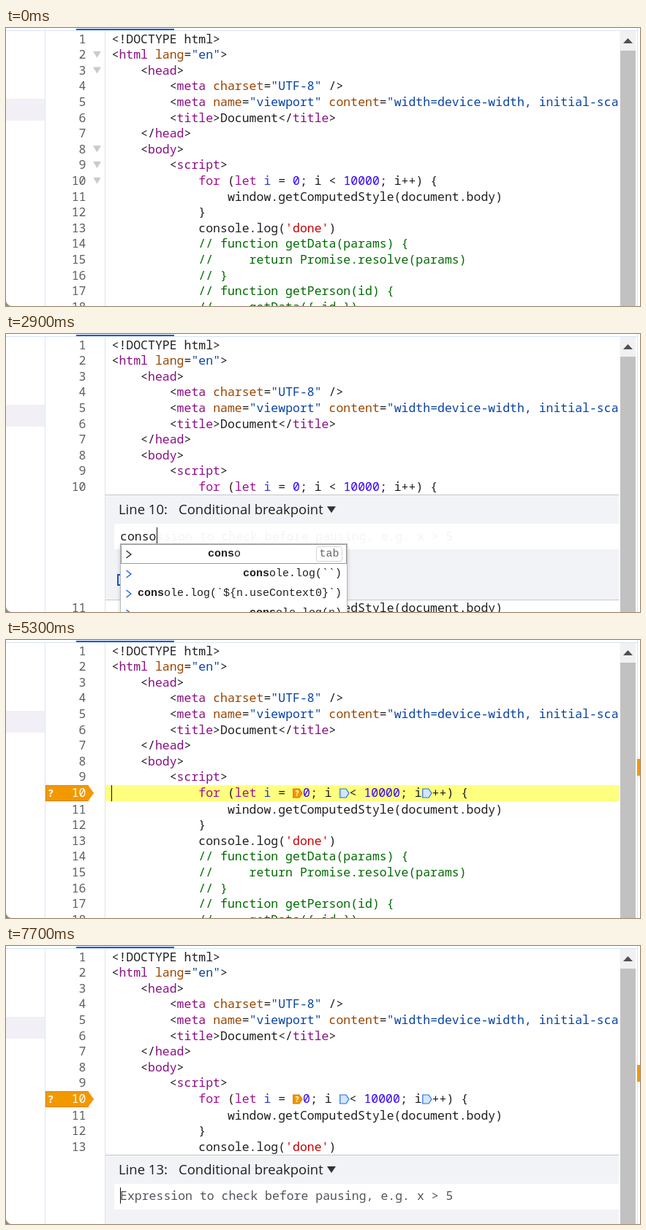
Write an HTML page that moves like this. It is 867 by 381 pixels and loops after 8 s.

```html
<!DOCTYPE html>
<html lang="en">
<head>
<meta charset="UTF-8">
<title>Conditional breakpoint</title>
<style>
  html, body { margin: 0; width: 100%; height: 100%; overflow: hidden; background: #fff; }
  #stage { position: relative; width: 867px; height: 381px; overflow: hidden; background: #fff; color: #1f1f1f; }
  #stage div { position: absolute; box-sizing: border-box; }
  [hidden] { display: none !important; }
  .mono, #code { font: 16.5px/21.6px "Noto Sans Mono", monospace; white-space: pre; }
  .ui { font: 18.5px/24px "Open Sans", sans-serif; white-space: pre; }

  #code { left: 54px; top: 4.2px; width: 784px; height: 377px; overflow: hidden; }
  #stage .row { position: relative; height: 21.6px; padding-left: 90.5px; }
  #stage .row.marked { height: 22.6px; line-height: 22.6px; }
  .num { left: 0; top: -.6px; width: 55.5px; text-align: right; color: #5c5f62; }
  .marked .num { color: #fff; }
  .fold { left: 65px; top: 6px; width: 11px; height: 9px; background: #606060; clip-path: polygon(0 0, 100% 0, 50% 100%); }
  .flag { left: 0; top: 0; width: 66px; height: 100%; clip-path: polygon(0 0, 58px 0, 66px 50%, 58px 100%, 0 100%); }
  .hover { background: #c3d7f8; }
  .bp { background: #f29900; box-shadow: inset 0 0 0 1px #e37e00; color: #fff; font-weight: bold; font-size: 14px; padding-left: 3px; }
  .glow { left: 82px; right: 0; top: 0; height: 100%; }
  .text { position: relative; top: -.6px; }
  .mark { display: none; width: 14px; height: 14px; vertical-align: -2px; }
  .marked .mark { display: inline-block; }
  .caret { width: 1px; height: 22px; background: #111; }
  .t { color: #8a0e85; } .k { color: #a0108f; } .a { color: #994500; } .v { color: #0842a0; }
  .d { color: #2a3fd0; } .n { color: #3200ff; } .s { color: #c80000; } .c { color: #006a00; }

  #stage #panel { position: relative; z-index: 1; margin-left: 82px; background: #f1f3f6; box-shadow: inset 0 1px #c6c8cb, inset 0 -1px #c6c8cb; }
  #title { left: 18px; top: 8px; }
  #kind { left: 100px; top: 8px; }
  #drop { left: 303px; top: 16px; width: 12px; height: 9px; background: #333; clip-path: polygon(0 0, 100% 0, 50% 100%); }
  #input { left: 12px; right: 0; top: 40px; height: 35px; padding: 5.5px 0 0 8px; background: #fff; overflow: hidden; }
  .hint { color: #50555a; }
  .ghost { color: #f4f4f4; }
  #link { left: 41px; top: 105px; color: #0b4fd8; font-size: 18.2px; text-decoration: underline; text-underline-offset: 2px; }
  #icon { position: absolute; left: 15px; top: 108px; }

  #list { left: 21px; top: 68px; background: #fff; box-shadow: 0 0 0 1px #b5b8bc, 0 2px 6px #0004; font: 15px/27px "Liberation Mono", monospace; }
  #stage .item { position: relative; display: flex; justify-content: space-between; align-items: center; height: 27px; padding: 0 7px 0 6px; gap: 7px; }
  #stage .item:first-child { border: 1px dotted #333; padding: 0 5px; }
  .item:first-child .word { margin: 0 9px; }
  .tab { width: 36px; line-height: 19px; box-sizing: border-box; border: 1px solid #d5d5d5; border-radius: 3px; text-align: center; color: #666; }

  #menu { width: 314px; height: 192px; background: #fff; border-radius: 6px; box-shadow: 0 0 0 1px #d0d0d0, 3px 4px 10px #0003; overflow: hidden; }
  .choice { left: 1px; width: 312px; height: 34.5px; padding-left: 24px; font: 14.5px/34px "Open Sans", sans-serif; }
</style>
</head>
<body>
<div id="stage">
  <div style="left:0;top:97px;width:53px;height:30px;background:#f2f0f6"></div>
  <div style="left:53px;top:3px;width:1px;height:378px;background:#d9e4fa"></div>
  <div style="left:135px;top:4px;width:1px;height:377px;background:#dfe3ea"></div>
  <div id="code"></div>
  <div style="left:0;top:3px;width:863px;height:1px;background:#d9e4fa"></div>
  <div style="left:96px;top:1px;width:134px;height:2px;background:#1a57d6"></div>
  <div style="left:838px;top:4px;width:24px;height:377px;background:#fbfbfb"></div>
  <div style="left:840px;top:4px;width:21px;height:27px;background:#f1f1f1"></div>
  <div style="left:844px;top:14px;width:13px;height:7px;background:#505050;clip-path:polygon(50% 0,100% 100%,0 100%)"></div>
  <div style="left:840px;top:31px;width:21px;height:350px;background:#c1c1c1"></div>
  <div style="left:863px;top:0;width:1px;height:381px;background:#d9e4fa"></div>
  <div id="tick" style="left:863px;top:163px;width:4px;height:23px;background:#f29900"></div>
  <div style="left:0;top:373px;width:8px;height:8px;background:radial-gradient(circle at 100% 0,#0000 7.5px,#8a8a8a 8.5px)"></div>
  <div id="menu"></div>
</div>
<script>
const LOOP = 8000;
const HINT = "Expression to check before pausing, e.g. x > 5";
const $ = id => document.getElementById(id);

const lines = `<!DOCTYPE html>
<html lang="en">
    <head>
        <meta charset="UTF-8" />
        <meta name="viewport" content="width=device-width, initial-scale=1.0" />
        <title>Document</title>
    </head>
    <body>
        <script>
            for (let i = ¤0; i ¤< 10000; i¤++) {
                window.getComputedStyle(document.body)
            }
            console.log('done')
            // function getData(params) {
            //     return Promise.resolve(params)
            // }
            // function getPerson(id) {
            //     getData({ id })`.split("\n");

const history = [
  "conso", "console.log(``)", "console.log(`${n.useContext0}`)", "console.log(n)",
  "console.time('record')", "console.timeEnd('record')", "console.trace('showSpinner')"
];
const choices = ["Add breakpoint", "Add conditional breakpoint…", "Add logpoint…", "Never pause here", "Add script to ignore list"];

// Timelines: [start in ms, value]
const foldOpacity = [[0, .33], [100, .5], [300, .8], [400, 1], [1600, .45], [1700, 0], [6400, .45], [6500, 1], [7600, .45], [7700, 0]];
const hoverLine = [[0, 0], [300, 10], [1500, 0], [6500, 13], [7500, 0]];
const panelLine = [[0, 0], [1500, 10], [5300, 0], [7500, 13]];
const menuAt = [[0, null], [700, [82, 206]], [1500, null], [6700, [64, 269]], [7500, null]];
const menuPick = [[0, 2], [1200, 1], [6700, 2], [7300, 1]];
const caretOn = [[0, 1], [2000, 0], [2400, 1], [4500, 0], [4900, 1]];
// [start, [characters typed, characters matched in the list]]
const typing = [
  [0, [0, 0]], [2200, [1, 1]], [2400, [2, 1]], [2500, [3, 2]],
  [2900, [5, 4]], [3000, [6, 5]], [3100, [7, 6]], [3200, [8, 7]], [3300, [8, 8]],
  [3700, [9, 8]], [3800, [10, 9]], [3900, [11, 10]], [4000, [12, 11]],
  [4900, [22, 0]], [7500, [0, 0]]
];
const at = (table, t) => table.findLast(step => step[0] <= t)[1];

const escape = s => s.replace(/</g, "&lt;");
const token = /(?<c>\/\/.*)|(?<s>'.*?')|(?<v>".*?")|(?<k>\b(?:for|let)\b)|(?<d>(?<=let )\w+)|(?<t>(?<=&lt;\/?)\w+)|(?<a>\b\w+(?==))|(?<n>\b\d+\b)/g;

function paint(line) {
  return escape(line).replace(token, (word, ...rest) => {
    const groups = rest.at(-1);
    const kind = Object.keys(groups).find(k => groups[k]);
    return `<span class="${kind}">${word}</span>`;
  });
}

function mark(first) {
  const [fill, edge] = first ? ["#f29900", "#d97700"] : ["#d5e5fd", "#1a73e8"];
  const label = first ? `<text x="3" y="11" font-size="10" font-weight="bold" fill="#fff">?</text>` : "";
  return `<svg class="mark" viewBox="0 0 14 14"><path d="M.8 1H9L13 7 9 13H.8Z" fill="${fill}" stroke="${edge}" stroke-width="1.2"/>${label}</svg>`;
}

const rows = lines.map((line, i) => {
  const row = document.createElement("div");
  const fold = [2, 3, 8, 9, 10].includes(i + 1) ? `<div class="fold"></div>` : "";
  let marks = 0;
  const text = paint(line).replace(/¤/g, () => mark(!marks++));
  row.className = "row";
  row.innerHTML = `<div class="glow"></div><div class="flag hover" hidden></div><div class="flag bp" hidden>?</div>` +
    `<div class="num">${i + 1}</div>${fold}<span class="text">${text}</span>`;
  $("code").append(row);
  return row;
});
const loopRow = rows[9];
const lineCaret = document.createElement("div");
lineCaret.className = "caret";
lineCaret.style.cssText = "left:90px;top:0";
loopRow.append(lineCaret);

const panel = document.createElement("div");
panel.id = "panel";
panel.innerHTML = `<div id="title" class="ui"></div><div id="kind" class="ui">Conditional breakpoint</div><div id="drop"></div>` +
  `<div id="input" class="mono"></div><div id="caret" class="caret" style="top:45px"></div>` +
  `<svg id="icon" width="18" height="18" viewBox="0 0 18 18" fill="none" stroke="#0b4fd8" stroke-width="1.9"><path d="M8 2H2V16H16V10M11 2H16V7M16 2 6.5 11.5"/></svg>` +
  `<div id="link" class="ui">Learn more: Breakpoint Types</div><div id="list"></div>`;
$("code").append(panel);

$("menu").innerHTML = choices.map((label, i) =>
  `<div class="choice" style="top:${(i - 1) * 34.5 + 30 + (i > 3 ? 9 : 0)}px">${label}</div>`).join("") +
  `<div style="left:0;right:0;top:138px;height:1px;background:#ddd"></div>`;
const choiceRows = [...document.querySelectorAll(".choice")];
const folds = [...document.querySelectorAll(".fold")];

function drawList(matched, prefix) {
  $("list").hidden = !matched;
  $("list").innerHTML = history.filter(h => h.startsWith(prefix)).map((h, i) => {
    const chevron = `<svg width="10" height="12" fill="none" stroke="${i ? "#1a56e8" : "#222"}" stroke-width="1.3"><path d="M1.5 1 8 6 1.5 11"/></svg>`;
    const word = `<span class="word"><b>${h.slice(0, matched)}</b>${h.slice(matched)}</span>`;
    return `<div class="item">${chevron}${word}${i ? "" : `<span class="tab">tab</span>`}</div>`;
  }).join("");
}

function drawPanel(t) {
  const line = at(panelLine, t);
  panel.hidden = !line;
  if (!line) return;
  const [typed, matched] = at(typing, t);
  const text = history[4].slice(0, typed);
  rows[line - 1].after(panel);
  panel.style.height = (typed ? 144.6 : 145.4) + "px";
  $("title").textContent = `Line ${line}:`;
  $("input").innerHTML = `${text}<span class="${typed ? "ghost" : "hint"}">${HINT.slice(typed)}</span>`;
  $("caret").hidden = !at(caretOn, t);
  $("caret").style.left = 20 + typed * 9.9 + "px";
  drawList(matched, text.slice(0, matched));
}

function draw(t) {
  const marked = t >= 5300;
  const glow = marked ? Math.max(0, 1 - (t - 5300) / 1200) : 0;
  const hover = at(hoverLine, t);
  rows.forEach((row, i) => row.querySelector(".hover").hidden = hover !== i + 1);
  folds.forEach(f => f.style.opacity = at(foldOpacity, t));
  loopRow.classList.toggle("marked", marked);
  loopRow.querySelector(".bp").hidden = !marked;
  loopRow.querySelector(".glow").style.background = `rgba(255,255,0,${glow / 2})`;
  lineCaret.hidden = t < 5300 || t >= 5800;
  $("tick").hidden = !marked;

  const place = at(menuAt, t);
  $("menu").hidden = !place;
  if (place) {
    $("menu").style.left = place[0] + "px";
    $("menu").style.top = place[1] + "px";
    choiceRows.forEach((c, i) => c.style.background = i === at(menuPick, t) ? "#e8e9eb" : "");
  }
  drawPanel(t);
}

const start = performance.now();
let last = -1;
function frame() {
  // Everything on screen moves in steps of 100 ms.
  const t = Math.floor((performance.now() - start) % LOOP / 100) * 100;
  if (t !== last) draw(last = t);
  requestAnimationFrame(frame);
}
frame();
</script>
</body>
</html>
```
